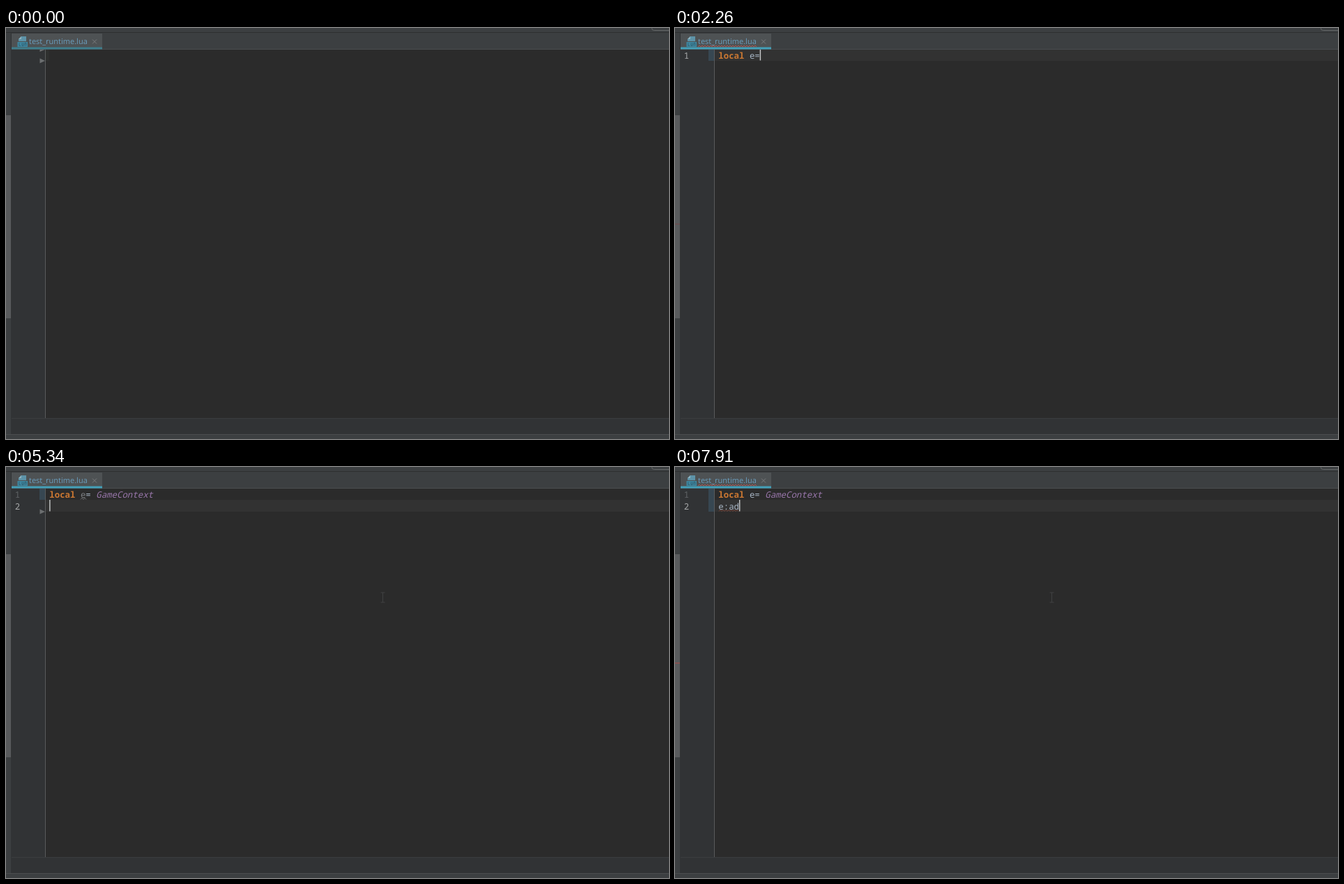
These frames come from a looping animation (951x589 px, 8000 ms). An HTML page:

```html
<!DOCTYPE html>
<html lang="en">
<head>
<meta charset="utf-8">
<title>Lua completion</title>
<style>
  html, body { margin: 0; width: 100%; height: 100%; overflow: hidden; background: #2b2b2b; }
  svg { display: block; }
  text { white-space: pre; text-rendering: geometricPrecision; }
  .code { font: 12.4px "Noto Sans Mono", "DejaVu Sans Mono", monospace; }
  .tab { font: 11px "Open Sans", "Noto Sans", sans-serif; }
  .hint { font: 9.75px "Open Sans", "Noto Sans CJK SC", "Noto Sans CJK", sans-serif; }
  .b { font-weight: 700; }
  .i { font-style: italic; }
</style>
</head>
<body>
<svg id="stage" width="951" height="589" xmlns="http://www.w3.org/2000/svg">
  <rect width="951" height="589" fill="#2b2b2b"/>
  <rect width="951" height="30" fill="#3c3f41"/>
  <rect y="6" width="951" height="1" fill="#2d2f30"/>
  <rect x="926.5" y="-9.5" width="40" height="13" rx="3" fill="none" stroke="#666869"/>
  <rect y="7" width="7" height="575" fill="#3c3f41"/>
  <rect y="125" width="7" height="291" fill="#595b5d"/>
  <rect x="7" y="7" width="1" height="575" fill="#323435"/>
  <rect x="8" y="30" width="943" height="1" fill="#4a4d4f"/>
  <rect x="8" y="31" width="48" height="528" fill="#313335"/>
  <rect x="8" y="559" width="943" height="23" fill="#313335"/>
  <rect x="8" y="559" width="943" height="1" fill="#3b3d3f"/>
  <rect y="582" width="951" height="7" fill="#3c3f41"/>
  <rect y="582" width="951" height="1" fill="#4b4d4e"/>
  <rect x="8" y="8" width="130" height="20" fill="#4e5254"/>
  <path d="M22 12h7v7h-11v-3z" fill="#5d93a8"/>
  <path d="M22 12v4h-4z" fill="#8fb3c0"/>
  <rect x="16.5" y="20" width="14.5" height="7" fill="#3e87a0"/>
  <path d="M19 21.5v4h2M23 21.5v4h2v-4M27 25.5v-4h2v4" fill="none" stroke="#2f5a6a" stroke-width=".8"/>
  <text class="tab" x="33" y="23" fill="#6a9dbd">test_runtime.lua</text>
  <path d="M124 16.5l6 6m0-6l-6 6" stroke="#787b7d"/>
  <g id="live"></g>
</svg>
<script>
const LOOP = 8000, CW = 7.44, X0 = 62.3, TOP = 31, LINE = 16.6, ROW = 18.6, FOOT = 15;
const FG = '#a9b7c6', GREY = '#8a8c8d', DIM = '#5c5f61', HIT = '#a872b0';

const ARROWS = 'Ctrl+向下箭头 and Ctrl+向上箭头 will move caret down and up in the editor';
const DOT = 'Press Ctrl+. to choose the selected (or first) suggestion and insert a dot afterwards';

// kind, name, type, tag
const L_LIST = [
  ['m', 'load(chunk)', 'any'], ['m', 'load(chunk, chunkname, mode, env)', 'void'],
  ['m', 'loadfile()', 'void'], ['m', 'loadfile(filename, mode, env)', 'void'],
  ['f', 'last', 'string'], ['f', 'list', 'table|[local list]|[global list]'],
  ['k', 'local', ''], ['f', 'logger', '[global logger]'], ['f', 'logpath', 'string'],
  ['f', 'lua_cpath', 'string'], ['f', 'lua_path', 'string'], ['f', 'lualoader', 'string']
];
const G_LIST = [
  ['f', 'GameBoardService', 'table|[local M]|[global GameBoardServ…', ''],
  ['f', 'GameObject', '[global GameObject]|UnityEngine.GameObject', '…'],
  ['f', 'GameState', '[global GameState]|GameState'],
  ['f', 'GameStateMgr', '[global GameStateMgr]|GameStateMgr'],
  ['f', 'ExtensionsGameObject', '[global ExtensionsGameObject]|Ext…', ''],
  ...['GainMgr', 'GateMgr', 'GaugeView', 'GetTime', 'GlobalMgr', 'GroupMgr', 'GuideMgr']
    .map(n => ['f', n, `[global ${n}]`])
];
const BASE_LIST = ['assert(v, message)', 'collectgarbage(opt, arg)', 'error(message, level)',
  'getmetatable(object)', 'next(table, index)', 'rawequal(v1, v2)', 'rawget(table, index)',
  'rawset(table, index, value)', 'require(modname)', 'select(index)',
  'setmetatable(table, metatable)', 'type(v)'].map(n => ['m', n, 'any']);
const E_LIST = [['m', 'addView(name)', 'void', '  [GameContext]'],
  ['m', 'getState()', 'any', '  [GameContext]'], ['m', 'reload()', 'void', '  [GameContext]']];

const pop = (list, query, col, width = 466, line = 0) => ({
  rows: list.filter(r => r[1].includes(query)), query, line, width,
  x: Math.floor(X0 + col * CW - 35)
});
const gamePop = q => pop(G_LIST, q, 9);
const imePop = { x: 64, width: 407, line: 1, query: '', hint: DOT,
  rows: [['p', 'GameContext', ''], ['p', 'local', '']] };

const stateAt = [
  [0, { a: '', b: null, pop: null, focus: false, mouse: null, err: false, mark: null }],
  [70, { mouse: [808.5, 500.5] }],
  [160, { mouse: null }],
  [320, { focus: true, mouse: [540.5, 187] }],
  [1250, { a: 'l', pop: pop(L_LIST, 'l', 0, 447) }],
  [1400, { a: 'lo', pop: pop(L_LIST, 'lo', 0, 447) }],
  [1480, { a: 'loc', pop: pop(L_LIST, 'loc', 0, 447) }],
  [1560, { a: 'loca', pop: pop(L_LIST, 'loca', 0, 447) }],
  [1640, { a: 'local', pop: null }],
  [1860, { a: 'local ', mouse: null }],
  [1950, { a: 'local e' }],
  [2030, { err: true, mark: '#74484a', eol: true }],
  [2180, { a: 'local e=' }],
  [2260, { eol: false }],
  [2340, { pop: pop(BASE_LIST, '', 8) }],
  [2410, { a: 'local e= ', pop: null, unused: true, mouse: [540.5, 187] }],
  [2640, { a: 'local e= G' }],
  [2720, { pop: gamePop('G') }],
  [2870, { a: 'local e= Ga', pop: gamePop('Ga') }],
  [3020, { a: 'local e= Gam' }],
  [3100, { a: 'local e= Game' }],
  [3190, { pop: gamePop('Game') }],
  [3510, { a: 'local e= GameC', pop: null }],
  [3670, { a: 'local e= GameCo' }],
  [3760, { a: 'local e= GameCon' }],
  [3860, { a: 'local e= GameCont' }],
  [3960, { err: false, mark: null }],
  [4110, { a: 'local e= GameConte' }],
  [4340, { a: 'local e= GameContex' }],
  [4580, { a: 'local e= GameContext' }],
  [4650, { a: 'local e= GameContext ' }],
  [4890, { global: true }],
  [5340, { b: '' }],
  [5650, { b: 'e', pop: pop(BASE_LIST, 'e', 0, 466, 1) }],
  [6030, { b: 'eL:', pop: imePop }],
  [6430, { b: 'eL', pop: null }],
  [6580, { b: 'e' }],
  [6730, { b: 'e:', err: true }],
  [6820, { pop: pop(E_LIST, '', 2, 466, 1) }],
  [6970, { mark: '#b04a48' }],
  [7600, { b: 'e:a', pop: pop(E_LIST.slice(0, 2), 'a', 2, 466, 1) }],
  [7830, { b: 'e:ad', unused: false, bad: true }],
  [7910, { pop: null }]
];
let last = {};
const steps = stateAt.map(([t, change]) => ({ t, s: last = { ...last, ...change } }));

const rect = (x, y, w, h, fill) => `<rect x="${x}" y="${y}" width="${w}" height="${h}" fill="${fill}"/>`;
const text = (x, y, s, fill, cls = 'code', more = '') =>
  `<text x="${x}" y="${y}" class="${cls}" fill="${fill}" ${more}>${s}</text>`;
const span = (s, fill, cls = '') => `<tspan fill="${fill}" class="${cls}">${s}</tspan>`;
const stroke = (d, color, w = 1) => `<path d="${d}" fill="none" stroke="${color}" stroke-width="${w}"/>`;

function wave(x, end, y, color) {
  let d = `M${x} ${y}`;
  for (let k = 1; x + k * 2 <= end; k++) d += `L${x + k * 2} ${y - (k % 2) * 2}`;
  return stroke(d, color, .9);
}

const fold = y => `<path d="M48.5 ${y - 3.5}l7.5 3.5l-7.5 3.5z" fill="#6c6f70"/>`;

function icon(kind, y) {
  if (kind === 'k') return '';
  if (kind === 'p') return `<path d="M4.5 ${y + 5.5}l1-3.6l6-6l2.6 2.6l-6 6zM12.3 ${y - 4.7}l1.3-1.2l2.6 2.6l-1.3 1.2z" fill="#9a9c9d"/>`;
  const [fill, ink] = kind === 'm' ? ['#8a505f', '#35282c'] : ['#94692f', '#382d20'];
  return `<circle cx="10" cy="${y}" r="6.5" fill="${fill}"/>` +
    text(10, y + 3.2, kind, ink, 'hint', 'text-anchor="middle"') +
    rect(23.5, y - .5, 5, 4, '#4a8a50') +
    stroke(`M20.5 ${y}v-2.2q0-1.3 1.7-1.3t1.7 1.3v2`, '#4a8a50');
}

function row([kind, name, type, tag = '  [_G]'], i, p, bar) {
  const y = 10 + ROW * i, base = y + 4.3, at = name.indexOf(p.query), n = p.query.length;
  const plain = kind === 'k' || kind === 'p';
  const color = plain ? GREY : '#bdbfc0', cls = plain ? '' : 'b';
  const label = n && at >= 0
    ? span(name.slice(0, at), color) + span(p.query, HIT) + span(name.slice(at + n), color) : name;
  const x = kind === 'p' ? 20 : 34.5;
  const right = p.width - (type.length === 38 ? 7 : bar ? 20 : 20.5);
  return icon(kind, y) +
    text(x, base, label, color, 'code ' + cls, kind === 'm' ? 'text-decoration="underline"' : '') +
    (plain ? '' : text(x + name.length * CW + (tag === '…' ? CW : 0), base, tag, DIM)) +
    text(right, base, type, GREY, 'code', 'text-anchor="end"');
}

function popup(p) {
  const body = Math.min(p.rows.length, 11.5) * ROW, bar = p.rows.length > 11.5;
  const w = p.width, h = Math.round(body + FOOT), y = p.line ? 64 : 47;
  const hint = p.hint || ARROWS, hy = h - 3.8;
  return `<svg x="${p.x}" y="${y}" width="${w + 1}" height="${h + 1}">` +
    rect(0, 0, w, h, '#3c3f41') +
    rect(1, 1, w - (bar ? 14 : 1), 17.8, '#4b4e50') +
    (bar ? rect(w - 9, 1, 8, 52, '#5c5f61') : '') +
    `<svg width="${w}" height="${body}">${p.rows.map((r, i) => row(r, i, p, bar)).join('')}</svg>` +
    `<text x="2" y="${hy}" class="hint" fill="#c3c5c6">${hint}` +
    `<tspan dx="5" fill="#589df6" text-decoration="underline">&gt;&gt;</tspan></text>` +
    (p.hint ? '' : text(w - 7, hy + .3, 'π', '#589df6', 'tab', 'text-anchor="middle"')) +
    `<rect x=".5" y=".5" width="${w - .5}" height="${h - .5}" fill="none" stroke="#555859"/></svg>`;
}

function firstLine(s) {
  const key = s.a.length >= 5 && s.a.startsWith('local');
  if (!key) return s.a;
  const tail = s.a.slice(9);
  return span('local', '#cc7832', 'b') + ' ' + span(s.a.slice(6, 7), s.unused ? '#7d8083' : FG) +
    s.a.slice(7, 9) + (s.global ? span(tail, '#9876aa', 'i') : tail);
}

function draw(s) {
  const two = s.b !== null, row = two ? 1 : 0, cur = two ? s.b : s.a;
  const y = two ? 47 : TOP, h = two ? 17 : 16;
  let out = rect(8, 27.5, 130, 3, s.focus ? '#439fb8' : '#3f7d8b');
  if (s.err) out += wave(33, 117, 27, '#bd5550');
  if (s.mark) out += rect(0, 280.5, 7, 1, s.mark);
  out += s.focus ? rect(57, y, 894, h, '#323232') : rect(57, TOP, 5, 16, '#2f302f');
  if (s.a) out += rect(48, TOP, 8, 16, '#374752');
  if (s.b) out += rect(48, 47, 8, 17, '#374752');
  out += rect(56, TOP, 1, 528, '#595b5c');
  if (!s.a) out += '<path d="M48.5 31h7l-7 3z" fill="#6c6f70"/>' + fold(47);
  if (s.b === '') out += fold(64);
  if (s.a) out += text(12.7, 43.7, '1', two ? '#606366' : '#a7a9aa') + text(X0, 43.7, firstLine(s), FG);
  if (two) out += text(12.7, 60.6, '2', '#a7a9aa') + text(X0, 60.6, s.b, FG);
  if (s.unused) out += wave(107, 115, 46.5, '#808386');
  if (s.eol) out += wave(114, 121, 46.5, '#bc3f3c');
  if (s.bad) out += wave(63, 92, 63.5, '#8a4a3c');
  if (s.focus) out += rect((X0 + cur.length * CW - .1).toFixed(1), y, 1.4, h - .5, '#c8cacb');
  if (s.mouse) {
    const [mx, my] = s.mouse;
    out += stroke(`M${mx - 3} ${my - 7}h6m-3 0v14m-3 0h6`, '#404142');
  }
  if (s.pop) out += popup(s.pop);
  return out;
}

const live = document.getElementById('live');
let shown = -1;
function tick() {
  const t = performance.now() % LOOP;
  let k = steps.length - 1;
  while (k && steps[k].t > t) k--;
  if (k !== shown) live.innerHTML = draw(steps[shown = k].s);
  requestAnimationFrame(tick);
}
tick();
</script>
</body>
</html>
```
